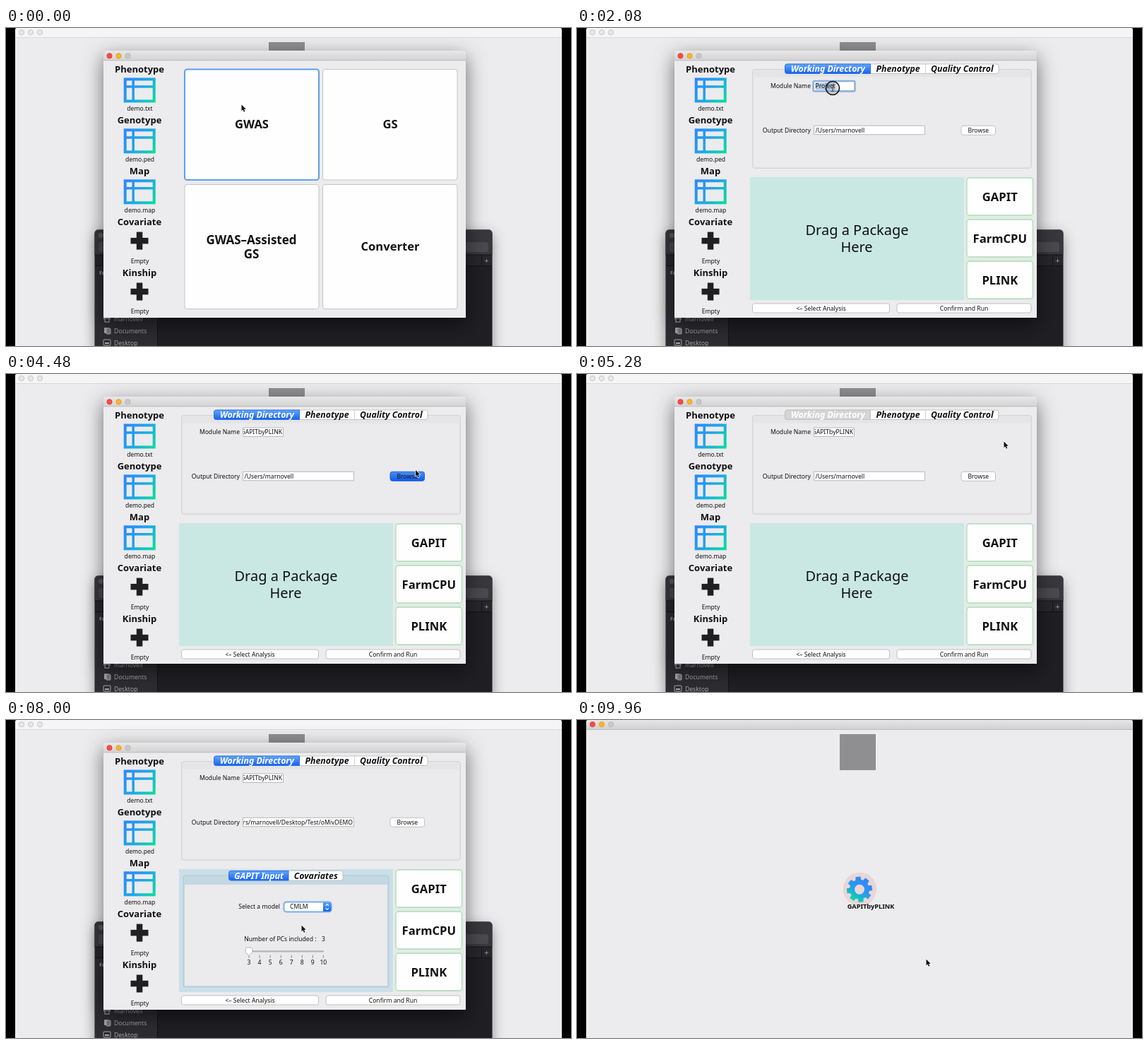
Recreate the animation shown at these times as an HTML page with a canvas. Size 800x450 px, loop 10 s.

```html
<!DOCTYPE html>
<html>
<head>
<meta charset="utf-8">
<style>
html, body { margin: 0; width: 100%; height: 100%; overflow: hidden; background: #000; }
canvas { display: block; }
</style>
</head>
<body>
<canvas id="stage" width="800" height="450"></canvas>
<script>
const ctx = document.getElementById('stage').getContext('2d');
const LOOP = 10000;
const FONT = '"Noto Sans", "Open Sans", sans-serif';
const USER = 'marnovell';
const HOME = '/Users/' + USER;
const MODULE = 'GAPITbyPLINK';
const PANEL = '#ecebed';

// Key moments in ms
const SLIDE = [274, 800];
const TYPING = [2320, 3440];
const BROWSE = [4360, 4620];
const BLUR = [4640, 5330];
const DROP = 6700, CLOSE = 9280;
const CLICKS = [[120, 220], [1840, 1920], [2000, 2120], [4360, 4460], [6050, DROP], [9120, 9220]];
// time, x, y
const PATH = [
  [1000, 334, 109], [1750, 362, 85], [3500, 362, 85], [4300, 580.5, 136.5],
  [4600, 580.5, 136.5], [5200, 605, 96], [5500, 605, 96], [5950, 600, 240],
  [6100, 600, 240], [6650, 400, 300], [6800, 400, 300], [7200, 430, 264],
  [7500, 430, 264], [7950, 419, 291], [8250, 419, 291], [8900, 505, 392],
  [9350, 505, 392], [9900, 495, 339]
];

const within = (t, [a, b]) => t >= a && t < b;
const clamp01 = v => Math.max(0, Math.min(1, v));
const progress = (t, [a, b]) => clamp01((t - a) / (b - a));

function pointer(t) {
  const i = PATH.findIndex(k => k[0] > t);
  if (i === 0) return PATH[0].slice(1);
  if (i < 0) return PATH[PATH.length - 1].slice(1);
  const [t0, x0, y0] = PATH[i - 1], [t1, x1, y1] = PATH[i];
  const p = progress(t, [t0, t1]), e = p * p * (3 - 2 * p);
  return [x0 + (x1 - x0) * e, y0 + (y1 - y0) * e];
}

function gradient(x0, y0, x1, y1, ...colors) {
  const g = ctx.createLinearGradient(x0, y0, x1, y1);
  colors.forEach((c, i) => g.addColorStop(i / (colors.length - 1), c));
  return g;
}

function rect(x, y, w, h, fill) {
  ctx.fillStyle = fill;
  ctx.fillRect(x, y, w, h);
}

function box(x, y, w, h, r, fill, stroke, line = 1) {
  ctx.beginPath();
  ctx.roundRect(x, y, w, h, r);
  if (fill) { ctx.fillStyle = fill; ctx.fill(); }
  if (stroke) { ctx.strokeStyle = stroke; ctx.lineWidth = line; ctx.stroke(); }
}

function disc(x, y, r, fill, stroke) {
  ctx.beginPath();
  ctx.arc(x, y, r, 0, 7);
  ctx.fillStyle = fill;
  ctx.fill();
  if (stroke) { ctx.strokeStyle = stroke; ctx.lineWidth = 1; ctx.stroke(); }
}

// y is the middle of the capitals
function text(str, x, y, size = 8.6, { style = '', align = 'center', color = '#111' } = {}) {
  ctx.font = `${style} ${size}px ${FONT}`;
  ctx.textAlign = align;
  ctx.fillStyle = color;
  ctx.fillText(str, x, y + size * 0.357);
}

function lights(x, y, active) {
  const colors = active ? ['#fb4b46', '#fdb42c', '#c9c8c9'] : Array(3).fill('#e9e8e9');
  const edges = active ? ['#e0403c', '#e0a020', '#b9b8b9'] : Array(3).fill('#c8c7c8');
  colors.forEach((c, i) => disc(x + i * 13, y, 3.6, c, edges[i]));
}

function mainWindow(active) {
  rect(0, 0, 800, 450, '#000');
  box(13, 0, 774, 452, [3, 3, 0, 0], PANEL);
  box(13, 0, 774, 13, [3, 3, 0, 0], active ? gradient(0, 0, 0, 13, '#e6e5e6', '#d2d1d2') : '#f6f5f6');
  rect(13, 13, 774, 0.8, active ? '#b4b3b4' : '#d6d5d6');
  lights(22, 6.2, active);
  rect(372, 20, 51, 51, '#8f8e91');
}

function fileBrowser() {
  ctx.save();
  ctx.shadowColor = 'rgba(0,0,0,.4)';
  ctx.shadowBlur = 18;
  ctx.shadowOffsetY = 6;
  box(125.5, 285.5, 563, 180, 5, '#1f1e23');
  ctx.restore();
  box(125.5, 285.5, 563, 35.5, [5, 5, 0, 0], '#38373c');
  rect(126, 321, 562, 16, '#27262b');
  rect(126, 320.5, 562, 1, '#151419');
  rect(126, 336, 562, 1, '#121116');
  rect(673, 321, 1, 15, '#151419');
  disc(134.5, 293.5, 3.7, '#5a595e');
  box(131, 303, 30, 14, 3, '#4a494e');
  box(600, 303, 83, 14, 3, '#4a494e');
  text('+', 680.5, 329, 11, { color: '#9a999e' });
  rect(126, 337, 88, 113, '#2d2c31');
  rect(214, 337, 1, 113, '#141318');
  const grey = { align: 'left', color: '#a5a4a9' };
  text('Favorites', 132, 347, 7, { ...grey, style: 'bold' });
  [USER, 'Documents', 'Desktop'].forEach((name, i) => text(name, 153, 411.5 + i * 17, 8.6, grey));
  ctx.strokeStyle = '#a5a4a9';
  ctx.lineWidth = 1.2;
  ctx.beginPath();
  ctx.moveTo(138, 412); ctx.lineTo(143, 407); ctx.lineTo(148, 412);
  ctx.stroke();
  ctx.strokeRect(140, 411, 6, 5);
  box(139, 424, 6, 8, 1, '#a5a4a9');
  box(142, 425, 6, 8, 1, '#77767b', '#a5a4a9');
  box(138, 441, 10, 8, 1, null, '#a5a4a9');
  rect(140, 445, 6, 2, '#a5a4a9');
}

function tableIcon(x, y) {
  ctx.strokeStyle = gradient(x, y, x + 45, y + 35, '#2d86ff', '#1fa5ea', '#06e19a');
  ctx.lineWidth = 4;
  ctx.strokeRect(x + 2, y + 2, 41, 31);
  ctx.lineWidth = 3.5;
  ctx.beginPath();
  ctx.moveTo(x + 13.5, y + 2); ctx.lineTo(x + 13.5, y + 33);
  ctx.moveTo(x + 2, y + 12.5); ctx.lineTo(x + 43, y + 12.5);
  ctx.stroke();
}

function sidebar() {
  const files = { Phenotype: 'demo.txt', Genotype: 'demo.ped', Map: 'demo.map', Covariate: '', Kinship: '' };
  Object.entries(files).forEach(([title, file], i) => {
    const y = 58.5 + i * 71.9;
    text(title, 189, y, 13, { style: 'bold' });
    if (file) {
      tableIcon(166.7, y + 12);
    } else {
      rect(176.5, y + 22.7, 25, 8.5, '#202020');
      rect(184.8, y + 14.4, 8.5, 25, '#202020');
    }
    text(file || 'Empty', 189.5, y + 55.3);
  });
}

function analysisCards() {
  const card = (x, y, w, h, focus) =>
    box(x, y, w, h, 3.5, '#fefefe', focus ? '#5f9fe8' : '#c6c5c6', focus ? 2 : 1);
  card(253, 58.5, 190, 156.5, true);
  card(448.5, 58.5, 190.5, 156.5);
  card(253, 221.5, 190, 176);
  card(448.5, 221.5, 190.5, 176);
  const bold = { style: 'bold' };
  text('GWAS', 348, 136.5, 16.6, bold);
  text('GS', 544, 136.5, 16.6, bold);
  text('GWAS–Assisted', 347.5, 299.5, 17, bold);
  text('GS', 347.5, 319.5, 17, bold);
  text('Converter', 544, 309.5, 16.6, bold);
}

// edges holds the x positions between neighbouring tabs
function tabs(names, edges, y, active) {
  const left = edges[0], right = edges[edges.length - 1], w = edges[1] - left;
  box(left, y, right - left, 13.5, 3, '#fff', '#c4c3c4');
  const fill = active ? gradient(0, y, 0, y + 13.5, '#62a6fa', '#1662f0') : '#d6d5d6';
  box(left, y, w, 13.5, [3, 0, 0, 3], fill, active ? '#2b70e4' : '#c4c3c4');
  names.forEach((name, i) => {
    if (i > 1) rect(edges[i], y, 1, 13.5, '#d4d3d4');
    const color = i ? '#111' : '#fff';
    text(name, (edges[i] + edges[i + 1]) / 2 + 0.3, y + 6.8, 12.3, { style: 'italic bold', color });
  });
}

function group(x, y, w, h, inset) {
  box(x, y, w, h, 3, 'rgba(0,0,0,.03)', 'rgba(0,0,0,.09)');
  rect(x + 2, y + inset, w - 4, h - inset - 2, '#ebeaec');
}

function button(label, x, y, w, pressed) {
  const fill = pressed ? gradient(0, y, 0, y + 13, '#4a90f6', '#1058ec') : '#fff';
  box(x, y, w, 13, 3, fill, pressed ? '#1f62dc' : '#c2c1c2');
  text(label, x + w / 2, y + 6.5);
}

function field(str, x, y, w, { focus, selected } = {}) {
  if (focus) box(x - 1, y - 1, w + 2, 14.5, 2, null, '#7fb2ee', 2.5);
  box(x, y, w, 12.5, 0, '#fff', '#bab9ba');
  ctx.save();
  ctx.beginPath();
  ctx.rect(x + 1, y, w - 1.5, 12.5);
  ctx.clip();
  ctx.font = `8.6px ${FONT}`;
  const width = ctx.measureText(str).width;
  if (selected) rect(x + 2, y + 1.5, width, 10, '#b3c9e4');
  text(str, Math.min(x + 2, x + w - 1.5 - width), y + 6.3, 8.6, { align: 'left' });
  ctx.restore();
}

function packageInput(active) {
  rect(245, 211, 303, 174, '#c9dfe9');
  group(251, 220, 291, 158, 13);
  tabs(['GAPIT Input', 'Covariates'], [315.5, 400, 477], 213.5, active);
  text('Select a model', 388, 264, 8.6, { align: 'right' });
  box(393.5, 257.5, 67, 14, 3.5, '#fff', '#76aef0', 2);
  box(449, 258, 11.5, 13, [0, 3, 3, 0], gradient(0, 258, 0, 271, '#58a0fa', '#1664f0'));
  ctx.strokeStyle = '#fff';
  ctx.lineWidth = 1.1;
  ctx.beginPath();
  for (const d of [-1, 1]) {
    ctx.moveTo(452.5, 264.5 + d * 1.7);
    ctx.lineTo(454.7, 264.5 + d * 4);
    ctx.lineTo(456.9, 264.5 + d * 1.7);
  }
  ctx.stroke();
  text('CMLM', 402, 264.3, 8.6, { align: 'left' });
  text('Number of PCs included :', 439.5, 309.5, 8.6, { align: 'right' });
  text('3', 449.5, 309.5);
  box(344, 326.3, 106, 2.2, 1, '#b6b5b6');
  for (let n = 3; n <= 10; n++) {
    const x = 344 + (n - 3) * 15.05;
    rect(x - 0.4, 332.5, 0.9, 4.5, '#888');
    text(n, x, 343);
  }
  ctx.beginPath();
  ctx.moveTo(339.2, 323.5); ctx.lineTo(341, 322); ctx.lineTo(347, 322);
  ctx.lineTo(348.8, 323.5); ctx.lineTo(348.8, 328.5); ctx.lineTo(344, 333.5); ctx.lineTo(339.2, 328.5);
  ctx.closePath();
  ctx.fillStyle = '#fff';
  ctx.strokeStyle = '#b5b4b5';
  ctx.lineWidth = 1;
  ctx.fill();
  ctx.stroke();
}

function projectPanel(t) {
  const active = !within(t, BLUR);
  group(248.5, 58.5, 395, 140, 11);
  tabs(['Working Directory', 'Phenotype', 'Quality Control'], [294.5, 415.5, 493, 597], 51, active);
  const right = { align: 'right' };
  text('Module Name', 331, 82.3, 8.6, right);
  text('Output Directory', 331, 144.6, 8.6, right);
  const typed = Math.ceil(progress(t, TYPING) * MODULE.length);
  field(typed ? MODULE.slice(0, typed) : 'Project', 335.5, 76, 57, {
    focus: t >= 1840 && t < BROWSE[0], selected: t >= 2000 && !typed
  });
  field(t < BLUR[1] ? HOME : HOME + '/Desktop/Test/oMivDEMO', 335.5, 138.3, 157);
  button('Browse', 544, 138.3, 48.5, within(t, BROWSE));

  rect(549.5, 211, 98, 174, '#deeee2');
  ['GAPIT', 'FarmCPU', 'PLINK'].forEach((name, i) => {
    const y = 212 + i * 59;
    box(552, y, 93.5, 53, 4, '#fefefe', '#b4d8bd', 1.3);
    text(name, 598.8, y + 26.8, 16.6, { style: 'bold' });
  });
  if (t < DROP) {
    rect(245, 211, 303, 174, '#c9e8e4');
    text('Drag a Package', 396.5, 286, 20);
    text('Here', 396, 309.5, 20);
  } else {
    packageInput(active);
  }
  button('<– Select Analysis', 248.5, 390, 194);
  button('Confirm and Run', 453, 390, 190, within(t, [9120, CLOSE]));
}

function dialog(t) {
  ctx.save();
  ctx.shadowColor = 'rgba(0,0,0,.55)';
  ctx.shadowBlur = 28;
  ctx.shadowOffsetY = 9;
  box(138, 32, 513, 378, [4, 4, 0, 0], PANEL);
  ctx.restore();
  box(138, 32, 513, 14, [4, 4, 0, 0], gradient(0, 32, 0, 46, '#e8e7e8', '#d3d2d3'));
  rect(138, 45.5, 513, 0.8, '#b5b4b5');
  lights(146.5, 39.4, true);
  sidebar();

  const shift = progress(t, SLIDE) * 411;
  ctx.save();
  ctx.beginPath();
  ctx.rect(240, 46.5, 411, 363.5);
  ctx.clip();
  ctx.translate(-shift, 0);
  if (shift < 411) analysisCards();
  ctx.translate(411, 0);
  if (shift > 0) projectPanel(t);
  ctx.restore();
}

function resultIcon() {
  disc(400.5, 239.5, 23.7, '#ead5d9');
  ctx.save();
  ctx.translate(400, 239.7);
  ctx.beginPath();
  const teeth = 8, step = Math.PI * 2 / teeth;
  for (let i = 0; i < teeth; i++) {
    const a = i * step - 0.12;
    [[-0.28, 14], [-0.19, 18.3], [0.19, 18.3], [0.28, 14]].forEach(([d, r]) =>
      ctx.lineTo(r * Math.cos(a + d), r * Math.sin(a + d)));
  }
  ctx.closePath();
  ctx.moveTo(7, 0);
  ctx.arc(0, 0, 7, 0, Math.PI * 2);
  ctx.fillStyle = gradient(9, -16, -9, 16, '#3586fa', '#2799ee', '#08dca4');
  ctx.fill('evenodd');
  ctx.restore();
  text(MODULE, 416, 263.6, 9.2, { style: 'bold' });
}

function arrow(x, y) {
  ctx.save();
  ctx.translate(x - 0.5, y - 0.5);
  ctx.beginPath();
  ctx.moveTo(0, 0); ctx.lineTo(0, 8.8); ctx.lineTo(2, 7); ctx.lineTo(3.4, 10.3);
  ctx.lineTo(4.9, 9.6); ctx.lineTo(3.5, 6.5); ctx.lineTo(6.2, 6.3);
  ctx.closePath();
  ctx.lineWidth = 1.4;
  ctx.lineJoin = 'round';
  ctx.strokeStyle = '#fff';
  ctx.stroke();
  ctx.fillStyle = '#111';
  ctx.fill();
  ctx.restore();
}

function textCursor(x, y) {
  ctx.strokeStyle = '#333';
  ctx.lineWidth = 0.9;
  ctx.beginPath();
  ctx.moveTo(x - 1.8, y - 4.5); ctx.lineTo(x, y - 3.8); ctx.lineTo(x + 1.8, y - 4.5);
  ctx.moveTo(x, y - 3.8); ctx.lineTo(x, y + 3.8);
  ctx.moveTo(x - 1.8, y + 4.5); ctx.lineTo(x, y + 3.8); ctx.lineTo(x + 1.8, y + 4.5);
  ctx.stroke();
}

function cursor(t) {
  const [x, y] = pointer(t);
  if (CLICKS.some(span => within(t, span))) {
    disc(x, y, 9.5, 'rgba(120,120,120,.22)');
    ctx.strokeStyle = '#111';
    ctx.lineWidth = 1.6;
    ctx.stroke();
  }
  if (within(t, [1650, 3560])) {
    if (!within(t, [TYPING[0], 3500])) textCursor(x, y);
  } else {
    arrow(x, y);
  }
}

function draw(t) {
  mainWindow(t >= CLOSE);
  if (t < CLOSE) {
    fileBrowser();
    dialog(t);
  } else {
    resultIcon();
  }
  cursor(t);
}

const start = performance.now();
function tick() {
  draw((performance.now() - start) % LOOP);
  requestAnimationFrame(tick);
}
tick();
</script>
</body>
</html>
```
